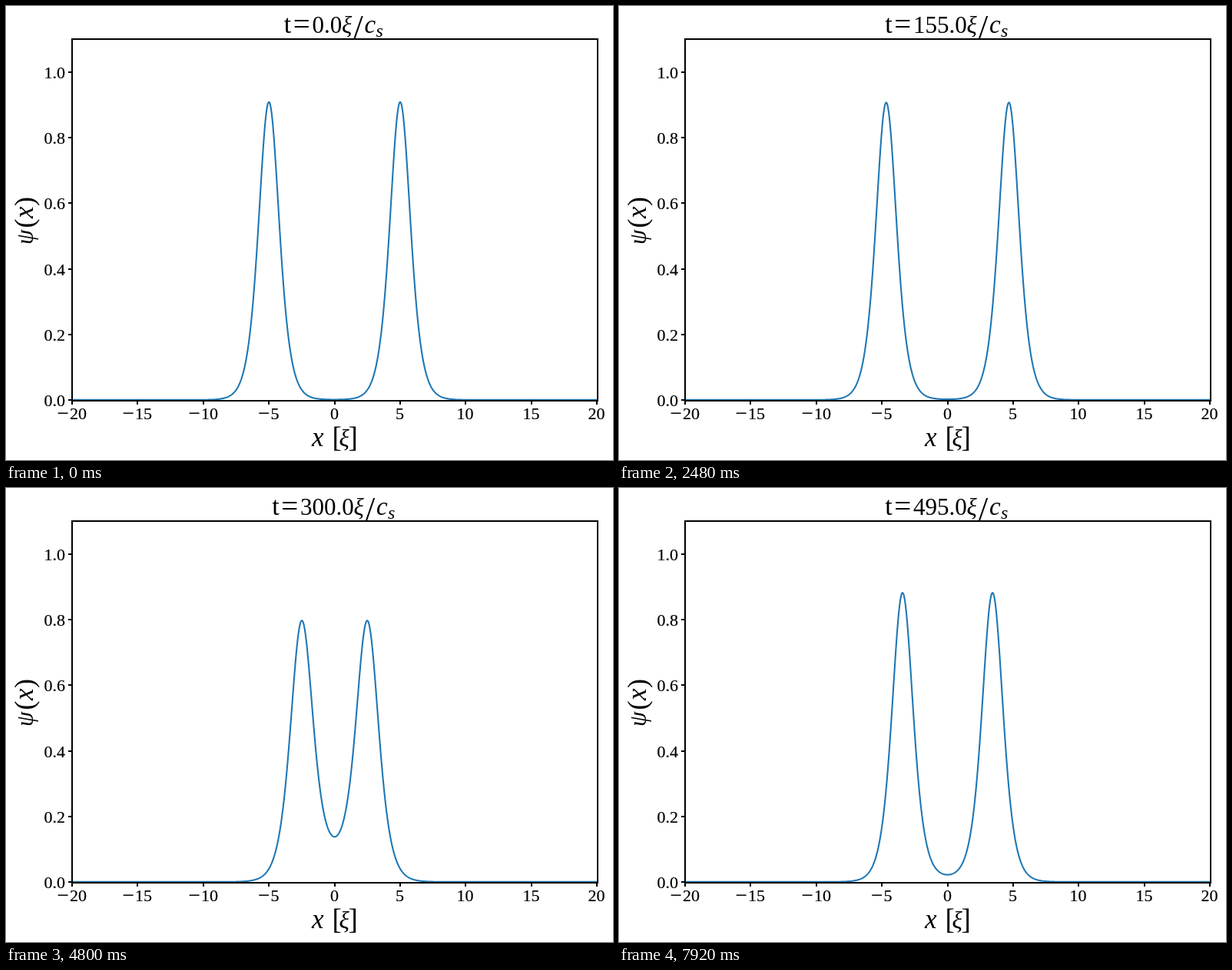
Animation, 790 px wide and 590 px high, one loop 8000 ms. Source, as an HTML page:

```html
<!DOCTYPE html>
<html lang="en">
<head>
<meta charset="utf-8">
<title>Soliton breather</title>
<style>
  html, body { margin: 0; width: 100%; height: 100%; overflow: hidden; background: #fff; }
  svg { display: block; width: 790px; height: 590px; }
  text { font-family: "Liberation Serif", "Times New Roman", serif; font-size: 31px; fill: #000; }
  .tick { font-size: 22px; stroke: #000; stroke-width: .2px; }
  .it { font-style: italic; }
  .axes { fill: none; stroke: #000; stroke-width: 2; }
</style>
</head>
<body>
<svg viewBox="0 0 790 590">
  <clipPath id="box"><rect x="86" y="43" width="684" height="470"/></clipPath>
  <path id="curve" clip-path="url(#box)" fill="none" stroke="#1f77b4" stroke-width="2.08" stroke-linejoin="round"/>
  <rect class="axes" x="86" y="43" width="684" height="470"/>
  <path id="marks" class="axes"/>
  <g id="ticks"></g>
  <g id="title"></g>
  <g id="xlabel"></g>
  <g id="ylabel" transform="translate(35 310) rotate(-90)"></g>
</svg>
<script>
const STEP_MS = 80, STEPS = 100, DT = 5;
const X0 = 427.6, SX = 17.075, Y0 = 511.9, SY = 426;

// Two-soliton bound state of the focusing NLS equation
const PERIOD = 203.7, SUM = 1.909;
const omega = 2 * Math.PI / PERIOD;
const gap = 2 * omega / SUM;
const a = (SUM + gap) / 2, b = (SUM - gap) / 2;

const $ = id => document.getElementById(id);
const { cosh, cos } = Math;

function density(x, c) {
  const u = a * cosh(b * x), v = b * cosh(a * x);
  const d = gap * gap * cosh(SUM * x) + SUM * SUM * cosh(gap * x) + 4 * a * b * c;
  return 4 * (SUM * gap) ** 2 * (u * u + v * v + 2 * u * v * c) / (d * d);
}

function put(parent, str, x, y, cls = "", size, anchor) {
  const t = document.createElementNS("http://www.w3.org/2000/svg", "text");
  t.textContent = str;
  t.setAttribute("x", x);
  t.setAttribute("y", y);
  if (cls) t.setAttribute("class", cls);
  if (size) t.style.fontSize = size + "px";
  if (anchor) t.setAttribute("text-anchor", anchor);
  parent.append(t);
  return t;
}

function drawAxes() {
  const ticks = $("ticks");
  let marks = "";
  for (let v = -20; v <= 20; v += 5) {
    const x = Math.round(X0 + v * SX), c = x - 0.5;
    const str = String(Math.abs(v)), w = str.length * 11;
    marks += `M${x} 513v5`;
    if (v < 0) put(ticks, "\u2212", c - 8 - w / 2, 538, "tick", 27);
    put(ticks, str, c + (v < 0 ? 8.5 : 0), 537, "tick", 0, "middle");
  }
  for (let i = 0; i <= 5; i++) {
    const y = Math.round(Y0 - i * 0.2 * SY);
    marks += `M86 ${y}h-5`;
    put(ticks, (i * 0.2).toFixed(1), 77, y + 8, "tick", 0, "end");
  }
  $("marks").setAttribute("d", marks);

  const xl = $("xlabel"), yl = $("ylabel");
  put(xl, "x", 398, 572, "it", 35);
  put(xl, "[", 424.5, 573, "", 37);
  put(xl, "ξ", 433.5, 572, "it");
  put(xl, "]", 445.5, 573, "", 37);
  put(yl, "ψ", 0, 0, "it");
  put(yl, "(", 21.5, 0.5, "", 36);
  put(yl, "x", 34, 0, "it", 35);
  put(yl, ")", 50, 0.5, "", 36);
}

const head = $("title");
const parts = [
  put(head, "t", 0, 35, "", 34),
  put(head, "=", 0, 37, "", 39),
  put(head, "", 0, 35),
  put(head, "ξ", 0, 35, "it"),
  put(head, "/", 0, 42, "", 44),
  put(head, "c", 0, 35, "it", 33),
  put(head, "s", 0, 40, "it", 24)
];

function drawTitle(t) {
  const str = t.toFixed(1), digits = str.length - 2;
  const left = 369.4 - 7.75 * digits;
  const end = left + 36.2 + 15.5 * (digits + 1) + 8.6;
  parts[2].textContent = str;
  [left, left + 12, left + 36.8, end - 0.5, end + 15, end + 29, end + 44]
    .forEach((x, i) => parts[i].setAttribute("x", x));
}

function drawCurve(t) {
  const c = cos(omega * t), pts = [];
  for (let i = 0; i <= 1000; i++) {
    const x = -20 + i * 0.04;
    pts.push((X0 + x * SX).toFixed(2) + " " + (Y0 - SY * density(x, c)).toFixed(2));
  }
  $("curve").setAttribute("d", "M" + pts.join("L"));
}

let shown = -1;
function tick() {
  const step = Math.floor(performance.now() / STEP_MS) % STEPS;
  if (step !== shown) {
    shown = step;
    drawTitle(step * DT);
    drawCurve(step * DT);
  }
  requestAnimationFrame(tick);
}

drawAxes();
tick();
</script>
</body>
</html>
```
